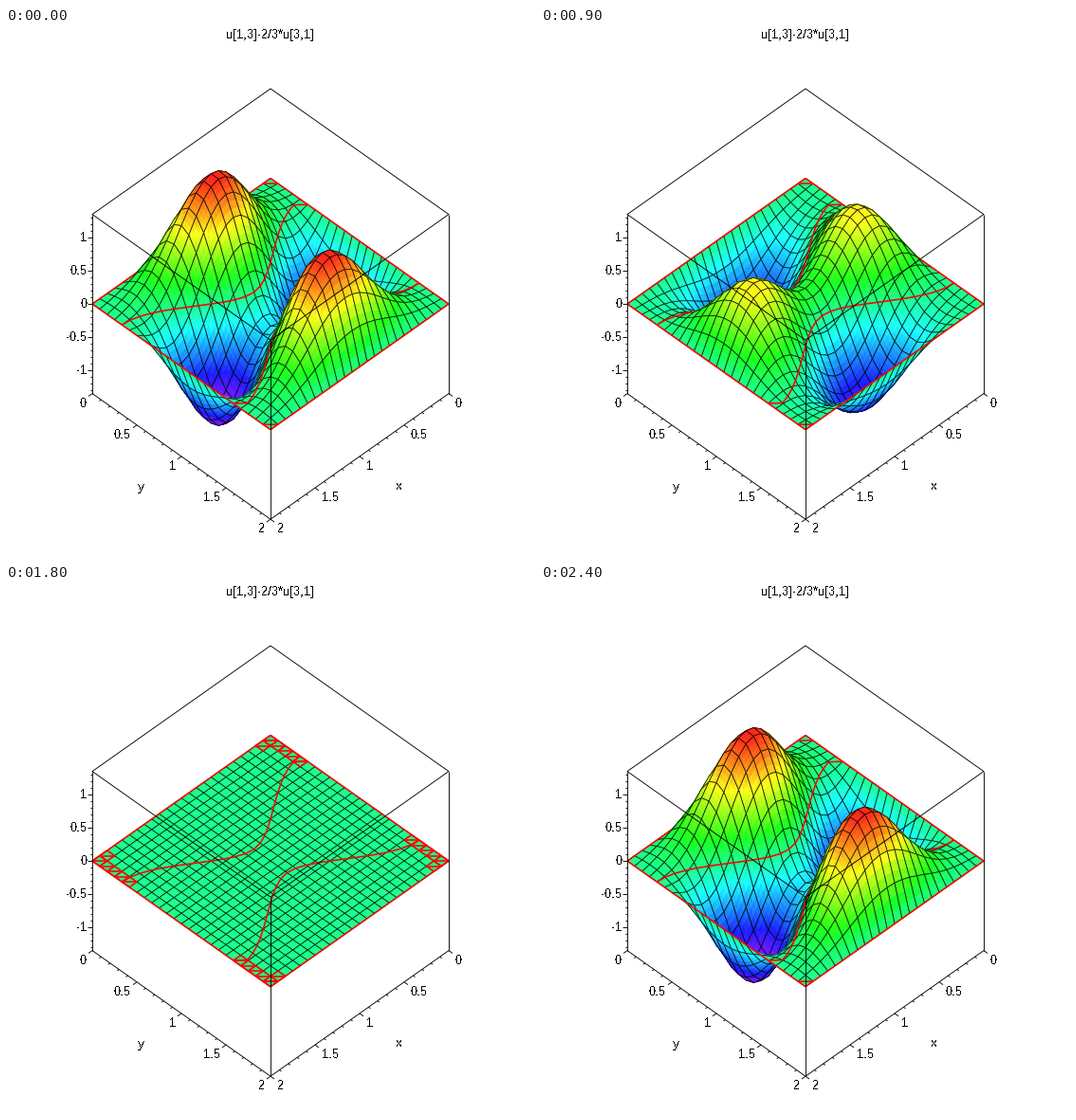
Write a matplotlib script that moves like this. It is 558 by 558 pixels and loops after 2.5 s.

```python
import numpy as np
import matplotlib.pyplot as plt
from matplotlib.animation import FuncAnimation
from matplotlib.collections import LineCollection, PolyCollection
from matplotlib.colors import hsv_to_rgb

SIZE, FRAMES, CELLS, SUB = 558, 25, 24, 3
STEP = 2 / CELLS
ZMAX = 1.351
RED = (1, 0, 0, 1)

plt.rcParams.update({"font.family": "Liberation Sans", "font.size": 13,
                     "text.antialiased": False, "text.hinting": "native",
                     "text.hinting_factor": 1})


def project(x, y, z=0.0):
    """Plot coordinates to stage pixels."""
    x, y, z = np.broadcast_arrays(x, y, z)
    return np.stack([279 + 94 * (y - x),
                     158.5 + 66.3 * (x + y) - 69.95 * z], axis=-1)


def mode(x, y):
    a, b = np.pi * x / 2, np.pi * y / 2
    return np.sin(a) * np.sin(3 * b) - 2 / 3 * np.sin(3 * a) * np.sin(b)


def nodal_y(x):
    c2 = (1 / 3 + 8 / 3 * np.cos(np.pi * x / 2) ** 2) / 4
    return 2 / np.pi * np.arccos(np.sqrt(c2))


def quad(i, j, u0, u1, v0, v1):
    """Part of a bilinear cell as four (x, y, height) corners."""
    h = mode(STEP * np.array([i, i + 1])[:, None], STEP * np.array([j, j + 1]))
    pts = []
    for u, v in ((u0, v0), (u1, v0), (u1, v1), (u0, v1)):
        z = np.array([1 - u, u]) @ h @ np.array([1 - v, v])
        pts.append((STEP * (i + u), STEP * (j + v), z))
    return pts


# Painter's list: (depth, corners, kind); kinds are fill, mesh, zero line
FILL, MESH, ZERO = range(3)
WIDTHS = np.array([0.6, 0.72, 1.6])
items = []


def add_zero_line(xs, ys):
    pts = list(zip(xs, ys))
    for a, b in zip(pts, pts[1:]):
        i, j = (min(int((p + q) / 2 / STEP), CELLS - 1) for p, q in zip(a, b))
        a3, b3 = (*a, 0), (*b, 0)
        items.append((i + j + 1.5, [a3, b3, b3, a3], ZERO))


cuts = np.arange(SUB + 1) / SUB
for i in range(CELLS):
    for j in range(CELLS):
        for u0, u1 in zip(cuts, cuts[1:]):
            for v0, v1 in zip(cuts, cuts[1:]):
                items.append((i + j, quad(i, j, u0, u1, v0, v1), FILL))
        items.append((i + j, quad(i, j, 0, 1, 0, 1), MESH))

grid = np.linspace(0, 2, CELLS + 1)
for edge in (0, 2):
    side = np.full(CELLS + 1, edge)
    add_zero_line(side, grid)
    add_zero_line(grid, side)
near = nodal_y(grid)
near[0] += STEP
add_zero_line(grid, near)
far = 2 - nodal_y(grid)
far[-1] -= STEP
add_zero_line(grid, far)
add_zero_line((STEP, 0), (0, STEP))
add_zero_line((2, 2 - STEP), (2 - STEP, 2))

items.sort(key=lambda item: item[0])
corners = np.array([item[1] for item in items], float)
kind = np.array([item[2] for item in items])
flat = project(corners[..., 0], corners[..., 1])
height = corners[..., 2]
is_fill = kind == FILL
level = height[is_fill].mean(axis=1) / ZMAX

edge_colors = np.zeros((len(items), 4))
edge_colors[:, 3] = 1
edge_colors[kind == ZERO] = RED
face_colors = np.zeros((len(items), 4))

fig = plt.figure(figsize=(SIZE / 72, SIZE / 72), dpi=72, facecolor="white")
ax = fig.add_axes([0, 0, 1, 1])
ax.set_xlim(0, SIZE)
ax.set_ylim(SIZE, 0)
ax.axis("off")

surface = PolyCollection(flat, linewidths=WIDTHS[kind], joinstyle="round",
                         zorder=1)
surface.set_snap(False)
ax.add_collection(surface)


def add_lines(segments, color, width, zorder):
    lines = LineCollection(segments, colors=[color], linewidths=width,
                           zorder=zorder)
    ax.add_collection(lines)
    return lines


# Cells that count as zero while the membrane passes through rest
rest = []
for i in range(CELLS):
    for j in range(CELLS):
        pts = np.array(quad(i, j, 0, 1, 0, 1))
        if np.abs(pts[:, 2]).max() < 0.045:
            p = project(pts[:, 0], pts[:, 1])
            rest += [p[[0, 1, 2, 3, 0]], p[[1, 3]]]
rest_lines = add_lines(rest, RED, 1.6, 2)

# Box: every edge that does not meet the hidden corner
top = [project(x, y, ZMAX) for x, y in ((0, 0), (2, 0), (2, 2), (0, 2))]
base = [project(x, y, -ZMAX) for x, y in ((2, 0), (2, 2), (0, 2))]
frame = [top + top[:1], base] + [[t, b] for t, b in zip(top[1:], base)]

# Ticks every 0.1, longer ones every 0.5
for n in range(21):
    size = 5 if n % 5 == 0 else 2.5
    left = project(2, n / 10, -ZMAX)
    right = project(n / 10, 2, -ZMAX)
    frame.append([left, left + size * np.array([-0.8, 0.57])])
    frame.append([right, right + size * np.array([0.8, 0.57])])
    if n % 5 == 0:
        label = f"{n / 10:g}"
        ax.text(left[0] - 6, left[1] + 10.5, label, ha="right", va="center")
        ax.text(right[0] + 7, right[1] + 10.5, label, ha="left", va="center")
for n in range(-13, 14):
    p = project(2, 0, n / 10)
    size = 5 if n % 5 == 0 else 2.5
    frame.append([p, p - [size, 0]])
    if n % 5 == 0:
        ax.text(85.5, p[1] + 0.5, f"{n / 10:g}", ha="right", va="center")
add_lines(frame, "black", 0.9, 3)

ax.text(279, 7.5, "u[1,3]-2/3*u[3,1]", ha="center", va="center")
ax.text(142, 484.5, "y", ha="center", va="center")
ax.text(414, 483.5, "x", ha="center", va="center")


def draw(k):
    amp = np.cos(2 * np.pi * k / (FRAMES - 1))
    verts = flat.copy()
    verts[..., 1] -= 69.95 * amp * height
    hue = np.clip(5 / 12 * (1 - amp * level), 0, 5 / 6)
    hsv = np.stack([hue, np.full_like(hue, 0.9), np.ones_like(hue)], axis=-1)
    face_colors[is_fill, :3] = hsv_to_rgb(hsv)
    face_colors[is_fill, 3] = 1
    edge_colors[is_fill] = face_colors[is_fill]
    surface.set_verts(verts)
    surface.set_facecolor(face_colors)
    surface.set_edgecolor(edge_colors)
    rest_lines.set_visible(abs(amp) < 1e-9)
    return surface, rest_lines


anim = FuncAnimation(fig, draw, frames=FRAMES, interval=100, repeat=True,
                     repeat_delay=0, blit=False)
plt.show()
```
